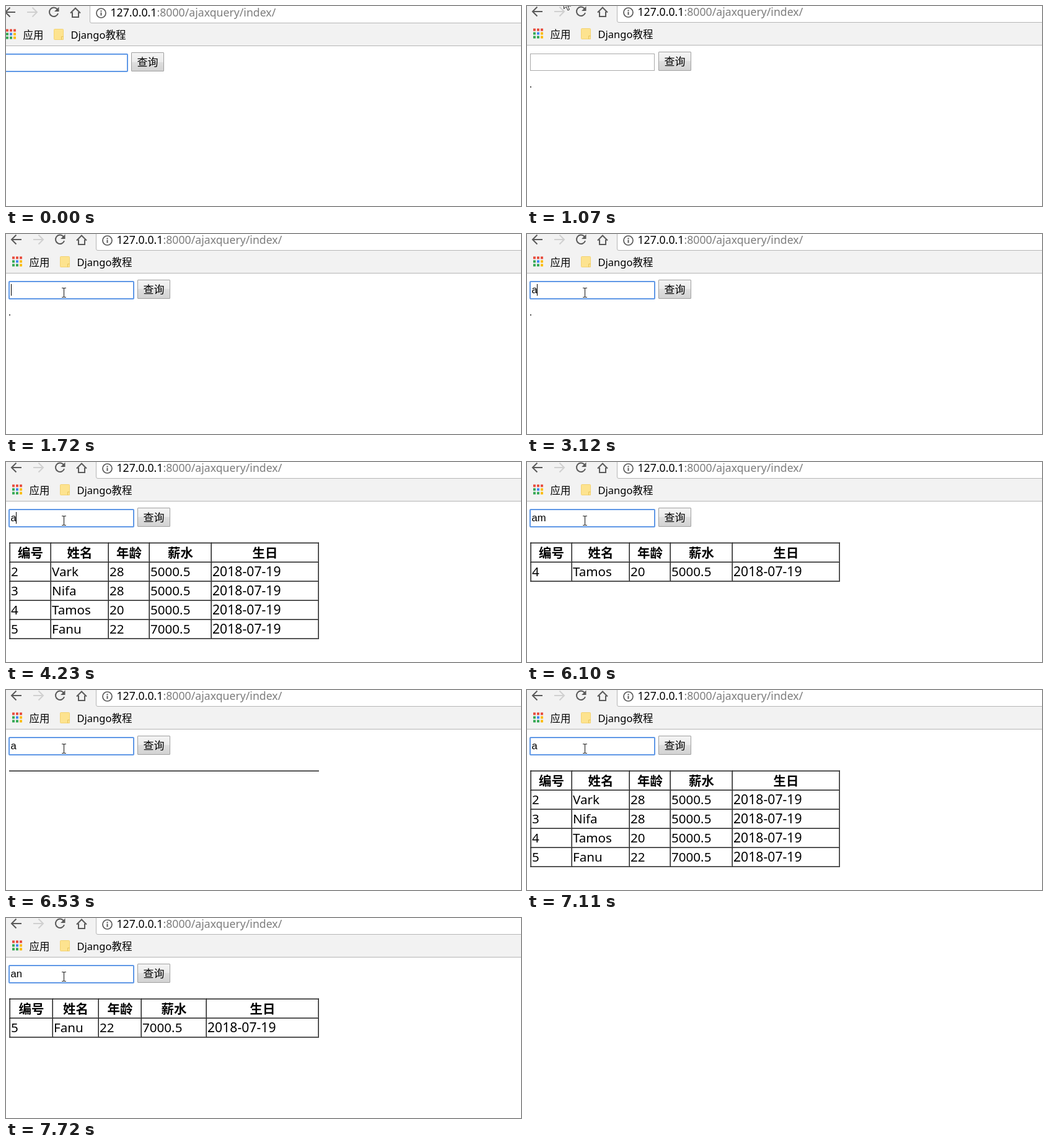
An HTML page that plays this animation: 831 px wide and 324 px high, repeating every 8000 ms.

```html
<!DOCTYPE html>
<html lang="zh-CN">
<head>
<meta charset="utf-8">
<title>Ajax query</title>
<style>
  html, body { margin: 0; width: 100%; height: 100%; overflow: hidden; background: #fff; }
  svg { display: block; width: 831px; height: 324px; }
  text { font-family: "Noto Sans", "Noto Sans CJK SC", "Noto Sans CJK", sans-serif; white-space: pre; }
  .bookmark { font-size: 16.5px; }
  .url { font-size: 17.7px; }
  .cell { font-size: 20.6px; }
  .date { font-size: 21.2px; }
  .head { font-size: 20.5px; font-weight: 700; text-anchor: middle; }
  #typed { font: 16.67px "Liberation Sans", Arial, sans-serif; }
  .icon { fill: none; stroke: #5a5a5a; stroke-width: 2; }
</style>
</head>
<body>
<svg viewBox="0 0 831 324">
  <defs>
    <linearGradient id="buttonFill" x2="0" y2="1">
      <stop offset="0" stop-color="#f4f4f4"/>
      <stop offset=".5" stop-color="#ebebeb"/>
      <stop offset=".5" stop-color="#dfdfdf"/>
      <stop offset="1" stop-color="#d2d2d2"/>
    </linearGradient>
  </defs>
  <g id="page">
    <rect x="-20" y="-5" width="880" height="68" fill="#f2f2f2"/>
    <path d="M-20 63.5H860" stroke="#b4b4b4"/>
    <rect x="145.5" y="-9.500" width="720" height="36" rx="2.500" fill="#fff" stroke="#b5b5b5"/>

    <path class="icon" d="M25 9H9.500M16.500 1.500L9 9l7.500 7.500"/>
    <path class="icon" style="stroke:#d0d0d0" d="M44 9h15.500M52.500 1.500L60 9l-7.500 7.500"/>
    <path class="icon" d="M92.500 4A7.200 7.200 0 1 0 94 11"/>
    <path d="M95.500 .5V8H88Z" fill="#5a5a5a"/>
    <path class="icon" d="M114 10.500l8-8 8 8M117 9v8h10V9"/>
    <circle class="icon" cx="163.500" cy="10.500" r="7.500" style="stroke-width:1.700"/>
    <path class="icon" d="M163.500 9.500v5M163.500 6.200v2"/>
    <text class="url" x="178.500" y="16">127.0.0.1<tspan fill="#7d7d7d">:8000/ajaxquery/index/</tspan></text>

    <g id="apps"></g>
    <text class="bookmark" x="37.500" y="52">应用</text>
    <path d="M88.500 36.500h13a1 1 0 0 1 1 1v16h-14a1 1 0 0 1-1-1v-15a1 1 0 0 1 1-1Z" fill="#fde38f" stroke="#f3d374"/>
    <path d="M99.500 53.500v-5h3" fill="none" stroke="#e8c45c"/>
    <text class="bookmark" x="114.500" y="52">Django教程</text>

    <rect id="field" fill="#fff"/>
    <text id="typed" x="7.500" y="96"></text>
    <rect id="caret" y="81" width="1" height="19"/>
    <rect x="212.500" y="74.500" width="52" height="30" rx=".5" fill="url(#buttonFill)" stroke="#a0a0a0"/>
    <text x="221.500" y="96" font-size="17">查询</text>
    <g id="table"></g>
  </g>
  <path id="arrow" d="M.5 .5V16.500L4.300 13l2.600 6 2.500-1.100-2.600-5.900H12Z" fill="#fff" stroke="#222"/>
  <path id="beam" d="M-3.500 -7.500H-1L0 -6.500 1 -7.500H3.500M0 -6.500V6.500M-3.500 7.500H-1L0 6.500 1 7.500H3.500" fill="none" stroke="#333" stroke-width="1.200"/>
</svg>
<script>
const LOOP = 8000;
const $ = id => document.getElementById(id);

const HEADS = ['编号', '姓名', '年龄', '薪水', '生日'];
const PEOPLE = [
  ['2', 'Vark', '28', '5000.5', '2018-07-19'],
  ['3', 'Nifa', '28', '5000.5', '2018-07-19'],
  ['4', 'Tamos', '20', '5000.5', '2018-07-19'],
  ['5', 'Fanu', '22', '7000.5', '2018-07-19']
];
const WIDE = [6, 72, 165, 231, 331, 504];
const NARROW = [6, 75, 149, 218, 323, 504];
const TOP = 131, ROW = 31;

// Each track lists [start time, value]; a value holds until the next start.
const FOCUS = [[0, true], [460, false], [1720, true]];
const TYPED = [[0, ''], [3120, 'a'], [5550, 'am'], [6530, 'a'], [7260, 'an']];
const CARET = [[0, false], [1720, true], [2280, false], [2840, true], [3700, false],
  [4230, true], [4810, false], [5280, true], [6100, false], [6680, true],
  [7110, false], [7260, true], [7720, false]];
const CARET_X = { '': 8, a: 16, am: 30, an: 26 };
const RESULT = [[0, 'none'], [3270, 'a'], [5700, 'am'], [6530, 'cleared'], [6680, 'a'], [7420, 'an']];
const POINTER = [[0, null], [1070, ['arrow', 59, -12]], [1190, ['arrow', 26, 42]],
  [1340, ['arrow', 49, 57]], [1460, ['beam', 80, 83]], [1580, ['beam', 91, 91]],
  [1720, ['beam', 93.5, 95]]];

const at = (track, t) => track.filter(([start]) => start <= t).pop()[1];

function setAttrs(node, attrs) {
  for (const key in attrs) node.setAttribute(key, attrs[key]);
}

// Bevelled borders: a grey pixel followed by a dark one on both axes.
function bevel(x0, x1, y0, y1, columns, rows) {
  const lines = shift =>
    rows.map(y => `M${x0} ${y + shift}H${x1}`).join('') +
    columns.map(x => `M${x + shift} ${y0}V${y1}`).join('');
  return `<path d="${lines(-0.5)}" stroke="#808080"/><path d="${lines(0.5)}" stroke="#2c2c2c"/>`;
}

function grid(columns, people) {
  const rows = Array.from({ length: people.length + 2 }, (_, i) => TOP + ROW * i);
  const heads = HEADS.map((label, i) =>
    `<text class="head" x="${(columns[i] + columns[i + 1]) / 2 + 0.5}" y="155">${label}</text>`);
  const cells = people.flatMap((person, r) => person.map((value, i) =>
    `<text class="cell${i === 4 ? ' date' : ''}" x="${columns[i] + 2}" y="${185 + ROW * r}">${value}</text>`));
  return bevel(5, 505, TOP - 1, rows[rows.length - 1] + 1, columns, rows) + heads.join('') + cells.join('');
}

const matching = query => PEOPLE.filter(person => person[1].includes(query));
const TABLES = {
  none: bevel(5, 7, 0, 0, [], [TOP]),
  cleared: bevel(5, 505, 0, 0, [], [TOP]),
  a: grid(WIDE, matching('a')),
  am: grid(WIDE, matching('am')),
  an: grid(NARROW, matching('an'))
};

const [R, G, B, Y] = ['#e84c3d', '#34a853', '#4285f4', '#fbbc05'];
$('apps').innerHTML = [R, R, R, G, B, Y, G, G, Y].map((color, i) =>
  `<rect x="${10 + i % 3 * 6}" y="${36.5 + Math.floor(i / 3) * 6}" width="4" height="4" fill="${color}"/>`).join('');

let shownTable;

function draw(t) {
  setAttrs($('page'), { transform: t < 1070 ? 'translate(-10 1)' : '' });

  setAttrs($('field'), at(FOCUS, t)
    ? { x: 5, y: 77, width: 201, height: 28, rx: 1, stroke: '#5f98e6', 'stroke-width': 2 }
    : { x: 5.5, y: 77.5, width: 200, height: 27, rx: 0, stroke: '#a9a9a9', 'stroke-width': 1 });

  const typed = at(TYPED, t);
  $('typed').textContent = typed;
  setAttrs($('caret'), { x: CARET_X[typed], visibility: at(CARET, t) ? 'visible' : 'hidden' });

  const result = at(RESULT, t);
  if (result !== shownTable) $('table').innerHTML = TABLES[shownTable = result];

  const [shape, x, y] = at(POINTER, t) || [];
  for (const id of ['arrow', 'beam']) {
    setAttrs($(id), id === shape
      ? { visibility: 'visible', transform: `translate(${x} ${y})` }
      : { visibility: 'hidden' });
  }
}

const begin = performance.now();
function tick() {
  draw((performance.now() - begin) % LOOP);
  requestAnimationFrame(tick);
}
tick();
</script>
</body>
</html>
```
